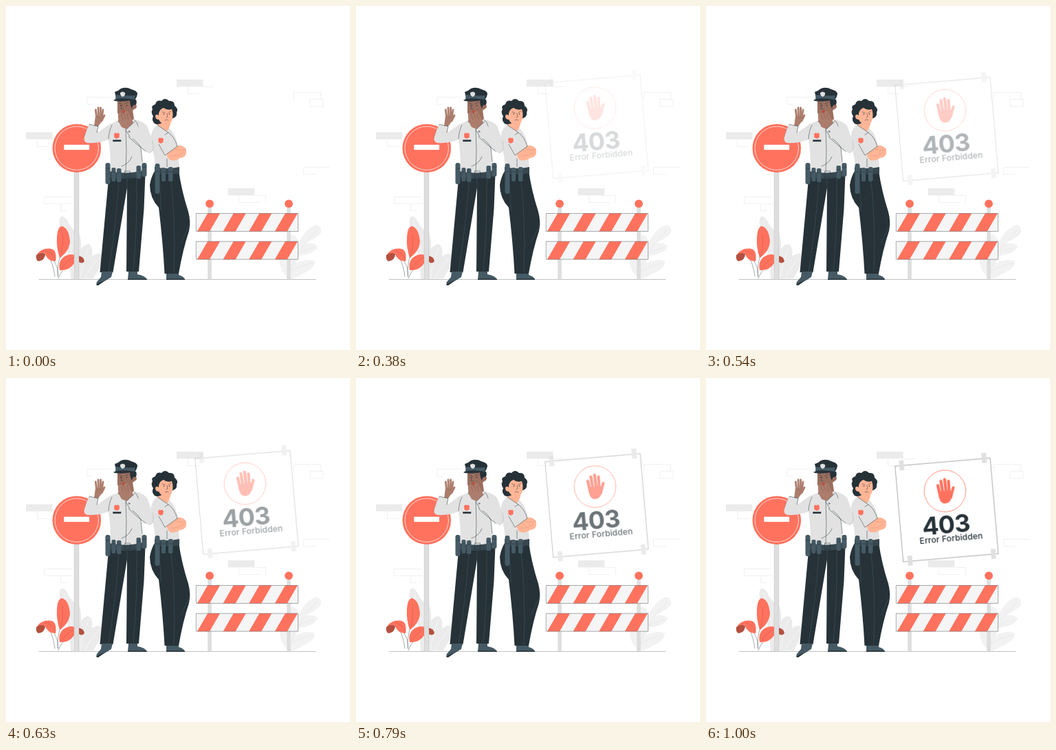
Animation of 500 by 500 pixels, one loop 1.04 s. Source, as an HTML page:

```html
<!DOCTYPE html>
<html lang="en">
<head>
<meta charset="utf-8">
<title>403</title>
<style>
html, body { margin: 0; width: 100%; height: 100%; overflow: hidden; background: #fff; }
svg { display: block; width: 100%; height: 100%; }
path, line, circle, rect, ellipse { stroke-linecap: round; stroke-linejoin: round; }
.coral { fill: #ff725e; }
.rust { fill: #b4503f; }
.dark { fill: #263238; }
.slate { fill: #455a64; }
.shirt { fill: #e2e2e2; }
.pale { fill: #ebebeb; }
.post { fill: #dedede; }
.brown { fill: #9b6f5f; }
.tan { fill: #ac7d6c; }
.peach { fill: #ffb596; }
.thin { fill: none; stroke: #263238; stroke-width: .5; }
.seam { fill: none; stroke: #455a64; stroke-width: .5; }
.brick { fill: none; stroke: #e8e8e8; stroke-width: .6; }
.vein { fill: none; stroke: #fff; stroke-width: .5; }
text { fill: #263238; font-family: Inter, "Open Sans", sans-serif; text-anchor: middle; }
</style>
</head>
<body>
<svg viewBox="0 0 500 500">
  <defs>
    <g id="palm">
      <g fill="none" stroke="#ff725e" stroke-width="4.2">
        <path d="M-9.8-9L-7.6 7M-4.8-14.8L-3.4 4M.8-16.8L1.4 4M6.2-14L5.8 5"/>
        <path d="M12.4-4Q10 2 7.5 10" stroke-width="4"/>
      </g>
      <path class="coral" d="M-10.2 0L8 0L10 3Q10 10 6 15Q3 18.5-2 18Q-8 17.5-9.4 9Z"/>
    </g>
    <path id="badge" class="coral" d="M-2.2-4.2L0-3.6L2.2-4.2L4.2-2L3.6 0L4 2.2L1.8 3.6L0 4.6L-1.8 3.6L-4 2.2L-3.6 0L-4.2-2Z"/>
    <g id="board">
      <rect x="276.7" y="0" width="147.8" height="26" fill="#f5f5f5"/>
      <g id="stripes" class="coral"></g>
      <rect x="276.7" y="0" width="147.8" height="26" class="thin" stroke-opacity=".8"/>
    </g>
    <rect id="tape" x="-3.4" y="-7.3" width="6.8" height="14.6" fill="#e0e0e0"/>
  </defs>

  <g class="pale">
    <rect x="248" y="107" width="38.5" height="10.3"/>
    <rect x="29" y="183.5" width="38.5" height="10.3"/>
    <rect x="322.7" y="265" width="38.5" height="10.3"/>
  </g>
  <path class="brick" d="M286 117.5H302M264.5 117V127.5H280
    M153 132.5H118V143H126M45.5 194V204.5H62
    M95 277.5H55.5V287.5H97M79.5 288V297.5H88
    M418.5 135.5V125.5H457.5V135M442 146V135.5H461V146H442
    M470 234.5H432.5V244.5H451M361 275.5H377.5V286M338.5 275.5V285.5H368"/>

  <!-- Foliage -->
  <path class="pale" d="M94 397Q92 352 80 327Q75 311 80 306Q86 304 92 318Q98 327 106 330Q110 340 109 353Q116 344 122 347Q127 353 125 364Q134 357 139 362Q141 370 134 384L127 396Z"/>
  <path class="vein" d="M84 312Q96 350 99 395M120 352Q111 373 108 395M136 365Q121 382 115 396"/>
  <path fill="#f2f2f2" d="M411 397Q396 382 398 366L411 360Q407 340 416 332Q424 334 425 345Q436 322 452 318Q461 322 457 331Q447 341 432 345Q447 343 453 349Q450 360 426 363Q424 370 421 374Q438 366 449 371Q449 382 431 389Q422 396 411 397Z"/>
  <path d="M411 396Q418 358 453 325M415 367Q432 354 448 351M414 386Q430 376 446 374" fill="none" stroke="#dedede" stroke-width=".5"/>
  <path d="M75 393Q74 379 79 362M71 393Q69 378 64 367M76 396Q80 386 86 380M76 393Q76 380 70 371" fill="none" stroke="#7f8789" stroke-width=".7"/>
  <path class="coral" d="M78 366Q73 351 74 336Q75 321 81 320Q91 322 93 342Q92 357 78 366Z"/>
  <path class="coral" d="M72 371Q75 353 63 352.5Q51 352 45 361L56 359Q61 372 72 371Z"/>
  <path class="rust" d="M44 362Q50 357 57 360Q57 370 47 371Q43 369 44 362Z"/>
  <path class="coral" d="M78 384Q75 371 85 364Q94 358 106 364L99 374Q92 385 78 384Z"/>
  <path class="rust" d="M105 363Q113 364 114 371Q110 376 105 371Z"/>
  <path d="M82 332Q84 348 79 366M58 356Q68 358 72 369M81 382Q88 370 99 365" fill="none" stroke="#b4503f" stroke-width=".4"/>

  <line x1="48" y1="397.5" x2="450" y2="397.5" stroke="#a3a8aa" stroke-width=".7"/>

  <!-- Stop sign -->
  <rect class="post" x="99" y="238" width="7" height="159.3"/>
  <path d="M99.2 240V397M105.8 240V397" fill="none" stroke="#b8b8b8" stroke-width=".4"/>
  <circle class="coral" cx="102.8" cy="206.7" r="35.3"/>
  <circle cx="102.8" cy="206.7" r="31.7" fill="none" stroke="#fff" stroke-width=".7"/>
  <rect x="84.3" y="201.7" width="36.8" height="7.4" fill="#fff"/>

  <!-- Officer with crossed arms -->
  <path class="dark" d="M216 240L251 239Q255 268 265 299Q269 314 266 327Q257 354 251 389H230.5Q228 343 222 293Q209 279 209 260Q211 248 216 240Z"/>
  <path class="seam" d="M239 246Q247 310 244 387M222 254Q226 285 225 298M254 345L267 318"/>
  <path class="slate" d="M233 389H251V391Q259 393 260 398H233Z"/>
  <path class="dark" d="M233 396.5H260V398H233Z"/>
  <path class="shirt" d="M220 173L234 175Q245 182 249 199L252 235Q235 240 217 236Q216 215 211 204Q208 180 220 173Z"/>
  <path class="peach" d="M222 162H239V172Q237 178 234 182Q226 181 220 174Z"/>
  <path class="shirt" d="M220 173L236 184L231 187L217 178Z"/>
  <path class="peach" d="M233 214L248 204Q252 201 257 204Q263 206 262 214Q261 220 253 221Q246 226 239 224Q235 222 233 214Z"/>
  <path d="M247 208Q254 211 261 208M240 218Q250 219 258 212" fill="none" stroke="#d98f72" stroke-width=".5"/>
  <path class="shirt" d="M230 183Q240 188 249 204L231 217L222 200Z"/>
  <path class="thin" d="M220 173L236 184L231 187M249 204L231 217L222 201M236 184Q245 190 249 204M234 222V234"/>
  <path class="dark" d="M216 171Q211 166 214 160Q210 155 213 150Q210 145 217 143Q219 136 226 138Q231 132 237 138Q245 137 245 145Q251 149 248 155Q249 161 243 163L238 166L224 171Q220 173 216 171Z"/>
  <path class="peach" d="M222 156Q224 149 229 148Q234 152 241 150Q244 158 241 167Q238 173 232 173Q225 171 222 165Q217 165 217 160Q218 156 222 159Z"/>
  <path class="thin" d="M227 154L231 155M236 155L240 153M234 156L235 161L233 162M231 166Q234 164 236 166"/>
  <circle class="dark" cx="229.5" cy="157" r=".8"/>
  <circle class="dark" cx="237.5" cy="157" r=".8"/>
  <use href="#badge" transform="translate(225 195.5) scale(.95)"/>
  <path d="M216 234Q234 238 252 234V243Q235 246 216 243Z" fill="#37474f"/>
  <g class="slate">
    <rect x="216.5" y="229" width="7" height="44" rx="3"/>
    <rect x="226" y="235" width="6" height="20" rx="2"/>
    <rect x="236" y="234" width="6.5" height="21" rx="2"/>
  </g>
  <path class="thin" d="M217 241H223M226 241H232M236 241H242"/>

  <!-- Officer with raised hand -->
  <path class="dark" d="M149.5 246L202.5 244L200.5 295L193 386H175L176 264L155.5 387H136.5Z"/>
  <path class="seam" d="M164 255Q160 320 149 386M190 251Q191 320 185 385M176 251V264"/>
  <path class="slate" d="M139 386H155L153 394Q142 400 134 406Q130 406 132 401L138 394Z"/>
  <path class="dark" d="M152 394.5Q142 400 134 406Q130 406 132 404Q142 400 152 394.5Z"/>
  <path class="slate" d="M178 386H191V390Q203 392 205 398H177Z"/>
  <path class="dark" d="M177 396.5H205V398H177Z"/>

  <g fill="none" stroke="#ac7d6c" stroke-width="2.8">
    <path d="M130.3 151L132 164M134 148L134.6 162M137.6 148L137.4 163M141 151L139 164M143 159L139 167"/>
  </g>
  <path class="tan" d="M130 160H141L139 168L134 175H128Z"/>
  <path d="M133 161Q135 164 138 162" fill="none" stroke="#7a5548" stroke-width=".4"/>

  <path class="shirt" d="M150 172L164 166L185 164Q200 168 205 174L213 196Q217 212 208 213.5Q202 212 196 206L200 239Q177 249 152 241Q152 212 149 194Q136 200 118 199Q112 197 114 190Q117 179 121 172L134 175L133 184Z"/>
  <path class="brown" d="M165 157L184 151L186 164L176 172L163 168Z"/>
  <path class="thin" d="M149 193Q150 180 154 173M121 172L134 175L132 184M196 206Q192 198 184 193M178 190Q192 203 203 211M176 171L172 176L163 168M174 178Q176 210 174 241M187 166Q193 171 192 179M183 219Q179 229 168 233M196 206L198 226"/>
  <path d="M113.8 190Q117 179 121 172M213 196Q217 212 208 213.5" class="thin" stroke-opacity=".3"/>

  <path class="brown" d="M162 137H187Q191 144 187 150Q184 151 183 154Q179 164 172 164Q164 162 162 155Z"/>
  <circle class="brown" cx="186.5" cy="146" r="3.4"/>
  <path class="dark" d="M180 136H189Q191 141 188 144Q184 143 183 149Q180 144 180 136Z"/>
  <path class="thin" d="M164 141L168 142M173 142L178 140M169 143L167 149L170 150"/>
  <circle class="dark" cx="166.5" cy="144.5" r=".8"/>
  <circle class="dark" cx="175.5" cy="144.5" r=".8"/>
  <path class="tan" d="M163 157Q166 153 170 157L173 153L177 153L182 163L186 172L178 180L168 176Q162 167 163 157Z"/>
  <ellipse cx="171" cy="153.5" rx="1.8" ry="2.1" fill="#c4483b"/>
  <path d="M167 157L170 165M171 156L174 164M176 156L178 165" fill="none" stroke="#7a5548" stroke-width=".5"/>
  <path class="shirt" d="M174 180L187 168L194 178L182 192Z"/>
  <path class="thin" d="M180 190L174 180L187 168"/>
  <circle class="thin" cx="179" cy="182.5" r="1"/>

  <path class="dark" d="M158 125Q164 123 167 120Q175 117 182 121Q190 123 191 127Q191 131 187 137H160Q160 131 158 125Z"/>
  <path class="slate" d="M160 129Q174 131 188 130L186.5 136.5Q172 134 159 136Z"/>
  <path class="dark" d="M156 137Q165 132 187 136Q171 140 158 138Z"/>
  <path d="M166 126L169.5 124.5L173 126Q174 130 169.5 132Q165.5 130 166 126Z" fill="#e0e0e0"/>
  <use href="#badge" transform="translate(161 188.5)"/>
  <rect class="dark" x="155.3" y="194.5" width="12" height="2.6"/>

  <path d="M150 240Q176 246 202 238V247Q176 254 150 249Z" fill="#37474f"/>
  <g class="slate">
    <rect x="144.5" y="228" width="7" height="31" rx="3"/>
    <rect x="153.5" y="235" width="6" height="20" rx="2"/>
    <rect x="161" y="236" width="6.5" height="20" rx="2"/>
    <rect x="189.5" y="232" width="6.5" height="19" rx="2"/>
    <rect x="197.5" y="228" width="7" height="20" rx="3"/>
  </g>
  <rect x="173" y="240" width="7.5" height="9.5" class="thin"/>
  <path class="thin" d="M145 236H151M154 241H159M161 242H167M190 238H196M198 234H204"/>

  <!-- Barricade -->
  <rect class="post" x="293.2" y="291" width="5.6" height="106.3"/>
  <rect class="post" x="408.2" y="291" width="5.6" height="106.3"/>
  <circle class="coral" cx="296" cy="287.3" r="5.9"/>
  <circle class="coral" cx="411" cy="287.3" r="5.9"/>
  <use href="#board" y="301.5"/>
  <use href="#board" y="342.2"/>

  <!-- Notice -->
  <g id="notice">
    <g transform="translate(350 191.7) rotate(-4.9)">
      <rect x="-69.2" y="-69.8" width="138.4" height="139.6" fill="#fff" stroke="#263238" stroke-width=".5" stroke-opacity=".85"/>
      <use href="#tape" x="-60" y="-70"/>
      <use href="#tape" x="60.5" y="-70.5"/>
      <use href="#tape" x="-59.5" y="69"/>
      <use href="#tape" x="62" y="69.5"/>
      <circle cx="-.2" cy="-27.5" r="30.3" fill="none" stroke="#ff725e" stroke-width=".8"/>
      <use href="#palm" x="-.2" y="-27.5"/>
      <text x="-3" y="34" font-size="36" font-weight="700" letter-spacing="-.8">403</text>
      <text x="2.8" y="46.2" font-size="12" font-weight="500" letter-spacing=".15">Error Forbidden</text>
    </g>
  </g>
</svg>
<script>
const LOOP = 1040, STEP = 1000 / 24, FIRST = 5, LAST = 24;

const stripes = document.getElementById("stripes");
for (let i = 0; i < 4; i++) {
  const stripe = document.createElementNS(stripes.namespaceURI, "path");
  stripe.setAttribute("d", `M${278 + i * 37.6} 26l15-26h18l-15 26z`);
  stripes.append(stripe);
}

const notice = document.getElementById("notice");
const drop = notice.animate([
  { opacity: 0, transform: "translateY(-20px)" },
  { opacity: 1, transform: "translateY(0)" }
], { duration: 1000, easing: "ease-in", fill: "both" });
drop.pause();

// The notice moves at 24 steps a second and stays hidden for the first few.
const start = performance.now();
function draw(now) {
  const time = Math.max(0, now - start) % LOOP;
  const step = Math.min(LAST, Math.floor((time + 3) / STEP));
  notice.style.visibility = step < FIRST ? "hidden" : "visible";
  drop.currentTime = step * STEP;
  requestAnimationFrame(draw);
}
draw(start);
</script>
</body>
</html>
```
